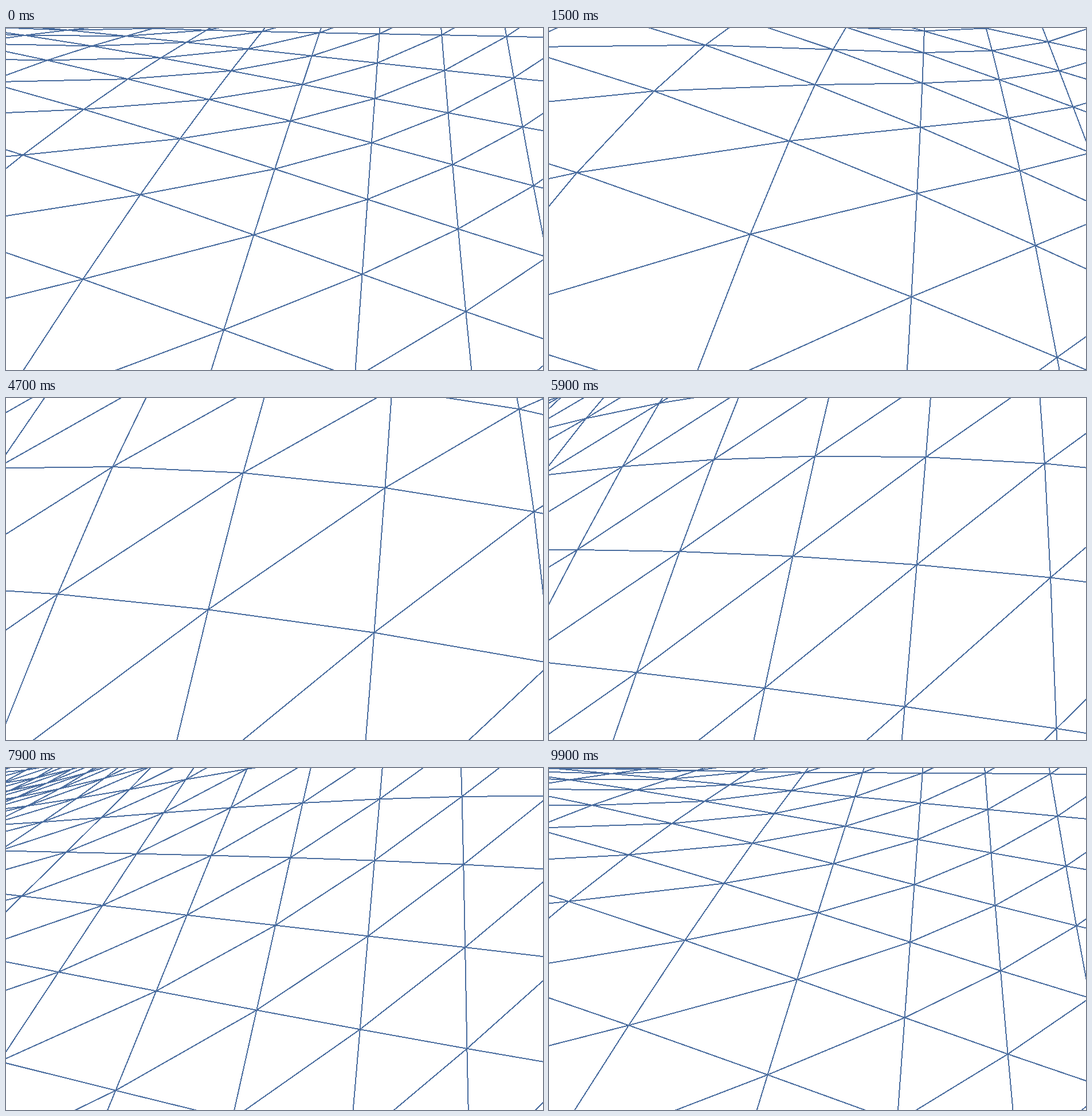
An HTML page that plays this animation: 937x597 px, repeating every 10 s.

```html
<!DOCTYPE html>
<html lang="en">
<head>
<meta charset="utf-8">
<title>Wireframe waves</title>
<style>
  html, body { margin: 0; width: 100%; height: 100%; overflow: hidden; background: #fff; }
  svg { display: block; width: 937px; height: 597px; }
  path { fill: none; stroke: #4a6d9f; stroke-width: 2; shape-rendering: crispEdges; }
</style>
</head>
<body>
<svg viewBox="0 0 937 597"><path id="mesh"/></svg>
<script>
const LOOP = 10000, STEP = 100;
const MIN_COL = -14, MAX_COL = 6, MIN_ROW = -2, MAX_ROW = 15;
const NADIR = { x: 503, y: 1242 };   // where all vertical lines meet on screen
const SWELL = 0.3206;
const PHASE_STEP = 11.32;            // degrees of wave per grid cell
const mesh = document.getElementById('mesh');
const sinDeg = a => Math.sin(a * Math.PI / 180);

// Equal to a product of one wave along the columns and one along the rows.
function height(col, row, turn) {
  const travelling = sinDeg(turn - 31.5 - PHASE_STEP * (col + row));
  const standing = sinDeg(150.75 + PHASE_STEP * (col - row));
  return SWELL * (travelling + standing);
}

// Perspective view of a grid vertex; row grows away from the viewer.
function project(col, row, turn) {
  const depth = 1.5737 - 0.0505 * col + 0.3095 * row - height(col, row, turn);
  if (depth < 0.05) return null;
  const scale = 1000 / depth;
  return {
    x: NADIR.x + (0.1674 + 0.3551 * col + 0.057 * row) * scale,
    y: NADIR.y - (1 - 0.0913 * col + 0.5373 * row) * scale
  };
}

function onStage(a, b) {
  return Math.max(a.x, b.x) > -5 && Math.min(a.x, b.x) < 942 &&
         Math.max(a.y, b.y) > -5 && Math.min(a.y, b.y) < 602;
}

function draw(time) {
  const turn = 360 * time / LOOP;
  const grid = [];
  for (let c = MIN_COL; c <= MAX_COL; c++) {
    const line = grid[c - MIN_COL] = [];
    for (let r = MIN_ROW; r <= MAX_ROW; r++) line.push(project(c, r, turn));
  }
  let d = '';
  const edge = (a, b) => {
    if (a && b && onStage(a, b)) {
      d += `M${a.x.toFixed(1)} ${a.y.toFixed(1)}L${b.x.toFixed(1)} ${b.y.toFixed(1)}`;
    }
  };
  grid.forEach((line, c) => line.forEach((p, r) => {
    const next = grid[c + 1];
    edge(p, line[r + 1]);
    if (next) {
      edge(p, next[r]);
      edge(p, next[r + 1]);
    }
  }));
  mesh.setAttribute('d', d);
}

let shown = -1;
const start = performance.now();
function tick() {
  const elapsed = (performance.now() - start) % LOOP;
  const time = Math.floor(elapsed / STEP) * STEP;
  if (time !== shown) draw(shown = time);
  requestAnimationFrame(tick);
}
tick();
</script>
</body>
</html>
```
